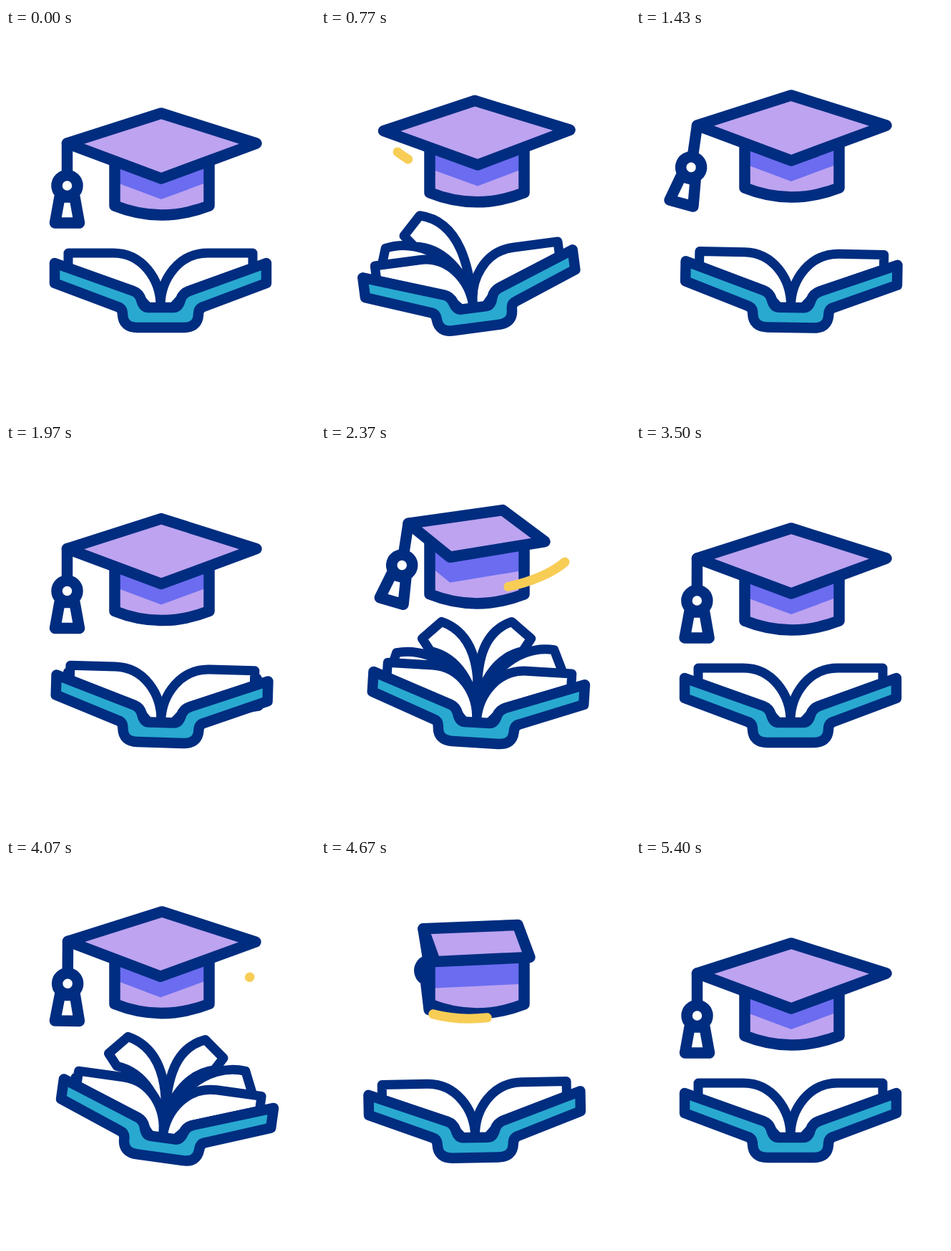
An HTML page that plays this animation: 432x540 px, repeating every 5430 ms.

```html
<!DOCTYPE html>
<html lang="en">
<head>
<meta charset="utf-8">
<title>Graduation cap and book</title>
<style>
  html, body { margin: 0; width: 100%; height: 100%; overflow: hidden; background: #fff; }
  svg { display: block; width: 100vw; height: 100vh; }
  .ink { stroke: #002d80; stroke-width: 15.5; stroke-linejoin: round; stroke-linecap: round; fill: #fff; }
  .cover { stroke-width: 14.5; }
  .page { stroke-width: 13; }
  .lilac { fill: #bda3f0; }
  .indigo { fill: #6b6cf0; }
  .teal { fill: #29a9d0; }
  .none { fill: none; }
  .swoosh { fill: none; stroke: #f7cd56; stroke-width: 13; stroke-linecap: round; }
</style>
</head>
<body>
<svg viewBox="0 0 432 540">
  <defs>
    <clipPath id="bandClip"><path d="M152 165V248Q217 274 284 248V165Z"/></clipPath>
  </defs>

  <g id="book">
    <g id="flying"></g>
    <path id="flatPage" class="ink page" d="M199 390L178 367L87 334V314H150C190 314 216 350 216 388"/>
    <use href="#flatPage" transform="translate(432) scale(-1 1)"/>
    <path class="ink cover teal" d="M68 328L178 367Q186 370 189 379Q192 390 199 390H234Q241 390 244 379Q247 370 256 367L364 328V356L276 389Q269 391 269 400Q268 418 248 418H184Q164 418 163 400Q163 391 156 389L68 356Z"/>
  </g>

  <g id="cap">
    <g id="tassel">
      <path class="ink none" stroke-width="14" d="M0 0V45"/>
      <g id="tuft">
        <path class="ink" d="M-10.5 75H10.5L17 111H-17Z"/>
        <circle class="ink" cy="59" r="14.5"/>
      </g>
    </g>
    <g clip-path="url(#bandClip)">
      <rect class="lilac" x="152" y="165" width="132" height="110"/>
      <polygon id="shadow" class="indigo"/>
    </g>
    <path class="ink none" d="M152 165V248Q217 274 284 248V165"/>
    <polygon id="board" class="ink lilac"/>
  </g>

  <path id="swooshOut" class="swoosh" pathLength="1" d="M341 166C300 202 180 230 107 173"/>
  <path id="swooshBack" class="swoosh" pathLength="1" d="M107 195C170 240 270 230 341 185"/>
</svg>

<script>
const CYCLE = 1810;
const $ = id => document.getElementById(id);
const mix = (a, b, k) => a + (b - a) * k;

// Eased 0 to 1 between two times, and a rise followed by a fall.
const ease = (t, from, to) => {
  const u = Math.min(1, Math.max(0, (t - from) / (to - from)));
  return (1 - Math.cos(Math.PI * u)) / 2;
};
const pulse = (t, [a, b, c, d]) => ease(t, a, b) - ease(t, c, d);

// Swings between [time, value] turning points.
const swing = (...turns) => t => turns.reduce((v, [time, next], i) =>
  i ? v + (next - turns[i - 1][1]) * ease(t, turns[i - 1][0], time) : next, 0);

const lift = swing([0, 0], [435, -44.5], [790, -18], [1185, -53], [1660, 0]);
const tilt = swing([50, 0], [410, 7.9], [440, 7.9], [780, -7.6], [1250, 2.9], [1560, 0]);
const sway = swing([430, 0], [590, 9.5], [800, 0], [1110, -10], [1410, 8.3], [1720, 0]);
const turn = t => pulse(t, [430, 800, 870, 1205]);

// Pages fan out around the spine; side is -1 for left, 1 for right.
const REST = 24;
const pages = [
  { side: -1, angle: 67, times: [100, 540, 780, 1050] },
  { side: -1, angle: 41, times: [400, 640, 800, 1020] },
  { side: 1, angle: 74, times: [150, 380, 580, 760] },
  { side: 1, angle: 46, times: [120, 350, 570, 740] }
];
for (const page of pages) {
  page.el = document.createElementNS('http://www.w3.org/2000/svg', 'path');
  page.el.setAttribute('class', 'ink page');
  $('flying').append(page.el);
}

function pagePath(side, angle) {
  const at = (r, deg) => {
    const a = deg * Math.PI / 180;
    return `${216 + side * r * Math.cos(a)} ${388 - r * Math.sin(a)} `;
  };
  return `M216 388C${at(53, 92)}${at(120, angle + 22)}${at(147, angle)}`
    + `L${at(138, angle - 14)}L${at(117, angle - 14)}`
    + `C${at(94, angle + 2)}${at(53, angle + 18)}216 388Z`;
}

// Each corner slides straight to its neighbour's place.
const CORNERS = [[217, 119], [350, 161], [217, 210], [85.5, 161]];
const boardAt = k => CORNERS.map(([x, y], i) => {
  const [nx, ny] = CORNERS[(i + 1) % 4];
  return [mix(x, nx, k), mix(y, ny, k)];
});

const swooshes = [
  { id: 'swooshOut', head: [440, 740], tail: [560, 815] },
  { id: 'swooshBack', head: [890, 1200], tail: [965, 1240] }
];

function draw(t) {
  $('book').setAttribute('transform', `rotate(${tilt(t)} 217 412)`);
  for (const { el, side, angle, times } of pages) {
    const open = pulse(t, times);
    el.style.visibility = open > 0.001 ? 'visible' : 'hidden';
    el.setAttribute('d', pagePath(side, mix(REST, angle, open)));
  }

  const k = turn(t), board = boardAt(k), drop = 29 + 32 * k * (1 - k);
  $('cap').setAttribute('transform', `translate(0 ${lift(t)})`);
  $('board').setAttribute('points', board.join(' '));
  $('shadow').setAttribute('points', board.map(([x, y]) => [x, y + drop]).join(' '));

  const a = sway(t), [x, y] = board[3];
  $('tassel').setAttribute('transform', `translate(${x} ${y}) rotate(${a})`);
  $('tuft').setAttribute('transform', `rotate(${a * 0.85} 0 59)`);

  for (const { id, head, tail } of swooshes) {
    const el = $(id), from = ease(t, ...tail);
    el.style.visibility = t >= head[0] && t < tail[1] ? 'visible' : 'hidden';
    el.style.strokeDasharray = `${Math.max(0.003, ease(t, ...head) - from)} 3`;
    el.style.strokeDashoffset = -from;
  }
}

const start = performance.now();
function frame() {
  draw((performance.now() - start) % CYCLE);
  requestAnimationFrame(frame);
}
frame();
</script>
</body>
</html>
```
